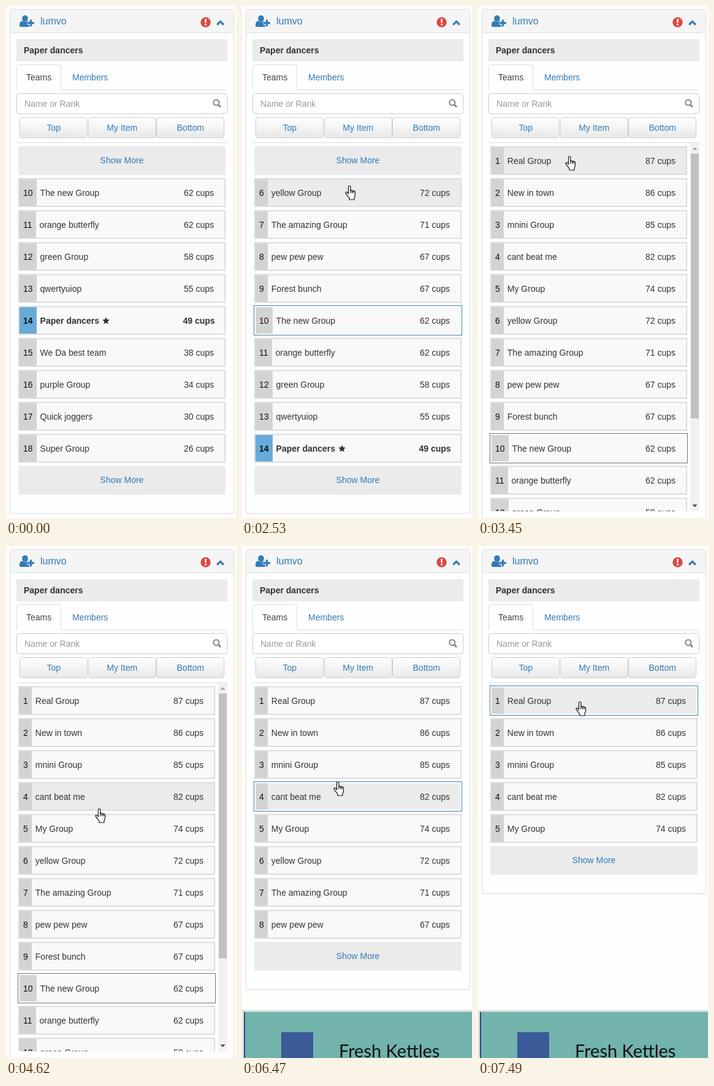
Write an HTML page that moves like this. It is 375 by 833 pixels and loops after 8 s.

```html
<!DOCTYPE html>
<html lang="en">
<head>
<meta charset="utf-8">
<title>Team ranking</title>
<style>
  html, body { margin: 0; width: 100%; height: 100%; overflow: hidden; background: #fefefe; }
  body { position: relative; font: 14px "Liberation Sans", Arial, sans-serif; color: #333; }
  svg.layer { position: absolute; left: 0; top: 0; }
  svg text { white-space: pre; }
  #panel { position: absolute; left: 6px; top: 5px; width: 366px; box-sizing: border-box;
    border: 1px solid #ddd; border-radius: 4px; background: #fefefe; box-shadow: 0 1px 1px rgba(0,0,0,.05); }
  #list { position: absolute; left: 17px; top: 223px; width: 344px; height: 599px; overflow: hidden; }
  .row, .more { position: absolute; left: 3px; width: 338px; height: 47px; box-sizing: border-box; white-space: pre; }
  .row { border: 2px solid #ddd; background: #f9f9f9; line-height: 44px; }
  .scroll .row { width: 321px; }
  .row.hover { background: #ebebeb; }
  .row.focus { border-color: #fefefe; outline: 1px solid #4385a5; background-clip: padding-box; }
  .scroll .row.focus { outline-color: #707070; }
  .row.own { font-weight: bold; }
  .rank { display: inline-block; height: 43px; padding: 0 6px; margin-right: 6px; background: #d3d3d3; color: #111; vertical-align: top; }
  .own .rank { background: #68aad9; }
  .row svg { margin-left: 5px; vertical-align: -1px; }
  .cups { position: absolute; right: 0; top: 0; width: 83px; text-align: center; }
  .more { background: #ebebeb; color: #337ab7; line-height: 46px; text-align: center; border-radius: 2px; }
  .more.hover { color: #23527c; text-decoration: underline; }
</style>
</head>
<body>
<svg class="layer" id="footer" width="375" height="833">
  <path d="M0 756.5H375" stroke="#ccd3d3" stroke-width="2"/>
  <rect y="758" width="3" height="75" fill="#e4e8ea"/>
  <rect x="3" y="758" width="2" height="75" fill="#27497e"/>
  <rect x="5" y="758" width="370" height="75" fill="#72b3ab"/>
  <rect x="64" y="791" width="52" height="42" fill="#3b5a98"/>
  <text x="158" y="832" font-family="Lato, sans-serif" font-size="29" fill="#111">Fresh Kettles</text>
</svg>
<div id="panel"></div>
<div id="list"></div>
<svg class="layer" width="375" height="833" fill="#337ab7">
  <defs>
    <linearGradient id="face" x2="0" y2="1"><stop stop-color="#fff"/><stop offset="1" stop-color="#e8e8e8"/></linearGradient>
  </defs>
  <path d="M7 43V9a3 3 0 0 1 3-3H368a3 3 0 0 1 3 3V43Z" fill="#f5f5f5"/>
  <path d="M7 43.5H371" stroke="#ddd"/>
  <ellipse cx="31" cy="20.2" rx="4.8" ry="5.2"/>
  <path d="M22 31.5c0-4.500 1.500-7 5-7.200q4 3 8 0c3.500.2 5.500 2.700 5.500 7.200q0 2.500-2.500 2.500H24.500q-2.500 0-2.500-2.500Z"/>
  <path d="M40.500 21.500V34M34.500 27.700H46.500" stroke="#f5f5f5" stroke-width="5.500"/>
  <path d="M40.500 22.300V33.200M35 27.700H46" stroke="#337ab7" stroke-width="3.200"/>
  <text x="56" y="30" font-size="16">lumvo</text>
  <circle cx="325.5" cy="26.500" r="8.200" fill="#d64c45"/>
  <path d="M324 21h3l-.5 6.800h-2ZM324.200 29h2.600v2.500h-2.600Z" fill="#fff"/>
  <path d="M344.200 30.500L349.500 25.200L354.800 30.500" fill="none" stroke="#337ab7" stroke-width="3.200"/>

  <rect x="17" y="54" width="344" height="36" fill="#ebebeb"/>
  <text x="29" y="77" font-weight="bold" fill="#333">Paper dancers</text>
  <path d="M17.500 136.500V99.500a4 4 0 0 1 4-4H85.500a4 4 0 0 1 4 4V136.500H361" fill="none" stroke="#ddd"/>
  <text x="33" y="121" fill="#444">Teams</text>
  <text x="108" y="121">Members</text>
  <rect x="17.500" y="142.500" width="343" height="33" rx="4" fill="#fff" stroke="#ccc"/>
  <text x="30" y="164" fill="#999">Name or Rank</text>
  <g fill="none" stroke="#858585" stroke-width="2"><circle cx="342.800" cy="157" r="4.500"/><path d="M346 160.500L350 164.500" stroke-width="2.600"/></g>
  <g id="buttons" text-anchor="middle"></g>
  <path d="M17 222.500H361" stroke="#ddd"/>

  <g id="scrollbar">
    <rect x="346" y="223" width="15" height="599" fill="#f1f1f1"/>
    <rect x="347" y="240" width="13" height="431" fill="#c1c1c1"/>
    <path d="M349.500 234h8l-4-4.500Z" fill="#a3a3a3"/>
    <path d="M349.500 811h8l-4 4.500Z" fill="#505050"/>
  </g>
  <g id="cursor" fill="#fff" stroke="#111" stroke-width="1.200" stroke-linejoin="round">
    <path d="M5.500 13.500V2.200a1.700 1.700 0 0 1 3.400 0V8.800c.2-1.300 2.500-1.200 2.700.5c.3-1.300 2.300-1.100 2.500.5c.3-1.200 2.400-.9 2.400.9V15c0 2.200-1.500 3.500-1.500 5.500V23H7V20.800C5.500 18.200 3.300 16 1.200 12.900C0 11 2.400 9.800 3.800 11.400Z"/>
    <path d="M8.900 8.500V12.500M11.600 9.300V12.500M14.100 9.800V12.800" fill="none"/>
  </g>
</svg>
<script>
const LOOP = 8000, PITCH = 52, TOP = 228, OWN = 14;
const $ = id => document.getElementById(id);

const teams = [
  ["Real Group", 87], ["New in town", 86], ["mnini Group", 85], ["cant beat me", 82], ["My Group", 74],
  ["yellow Group", 72], ["The amazing Group", 71], ["pew pew pew", 67], ["Forest bunch", 67],
  ["The new Group", 62], ["orange butterfly", 62], ["green Group", 58], ["qwertyuiop", 55],
  ["Paper dancers", 49], ["We Da best team", 38], ["purple Group", 34], ["Quick joggers", 30], ["Super Group", 26]
];

// bottom: lower edge of the panel
const views = [
  { at: 0, first: 10, last: 18, above: true, bottom: 826 },
  { at: 1900, first: 6, last: 14, above: true, focus: 10, bottom: 826 },
  { at: 3450, first: 1, last: 14, focus: 10, bottom: 850, scroll: true },
  { at: 5230, first: 1, last: 8, focus: 4, bottom: 722, footer: true },
  { at: 7490, first: 1, last: 5, focus: 1, bottom: 566, footer: true }
];

// Pointer moves: the first step lands at start, the last at end; bend curves x.
const moves = [
  { start: 1050, end: 1520, steps: 7, to: [179, 309] },
  { start: 1670, end: 1750, steps: 2, to: [178, 309] },
  { start: 2530, end: 2840, steps: 5, to: [141, 231], bend: 1.5 },
  { start: 3080, end: 3130, steps: 2, to: [149, 245] },
  { start: 4080, end: 4620, steps: 8, to: [152, 428] },
  { start: 4840, end: 5000, steps: 3, to: [153, 417] },
  { start: 6390, end: 7090, steps: 10, to: [166, 254] }
];

function pointerAt(t) {
  if (t < moves[0].start) return null;
  let [x, y] = [186, 424];
  for (const { start, end, steps, to, bend = 1 } of moves) {
    if (t < start) break;
    const step = Math.floor((t - start) / (end - start) * (steps - 1) + 1e-6) + 1;
    const u = Math.min(1, step / steps);
    x += (to[0] - x) * u ** bend;
    y += (to[1] - y) * u;
  }
  return [x, y];
}

const star = '<svg width="12" height="12" viewBox="-6 -6 12 12"><polygon fill="#333" points="' +
  Array.from({ length: 10 }, (_, i) => {
    const r = i % 2 ? 2.9 : 6.3, a = i * Math.PI / 5;
    return `${(r * Math.sin(a)).toFixed(2)},${(0.4 - r * Math.cos(a)).toFixed(2)}`;
  }).join(" ") + '"/></svg>';

function rowHTML(rank, slot, view) {
  const [name, cups] = teams[rank - 1];
  const own = rank === OWN;
  const kind = "row" + (own ? " own" : "") + (rank === view.focus ? " focus" : "");
  return `<div class="${kind}" style="top:${slotTop(slot)}px"><span class="rank">${rank}</span>` +
    `${name}${own ? star : ""}<span class="cups">${cups} cups</span></div>`;
}

const slotTop = slot => TOP - 223 + slot * PITCH;
const moreHTML = slot => `<div class="more" style="top:${slotTop(slot)}px">Show More</div>`;

function showView(view) {
  const items = view.above ? [moreHTML(0)] : [];
  for (let rank = view.first; rank <= view.last; rank++) items.push(rowHTML(rank, items.length, view));
  items.push(moreHTML(items.length));
  $("list").innerHTML = items.join("");
  $("list").className = view.scroll ? "scroll" : "";
  $("panel").style.height = view.bottom - 5 + "px";
  $("scrollbar").style.display = view.scroll ? "" : "none";
  $("footer").style.display = view.footer ? "" : "none";
}

$("buttons").innerHTML = ["Top", "My Item", "Bottom"].map((label, i) => {
  const x = 22.5 + i * 111.5;
  return `<rect x="${Math.floor(x) + 0.5}" y="181.5" width="110" height="33" rx="4" fill="url(#face)" stroke="#ccc"/>` +
    `<text x="${x + 55.2}" y="203">${label}</text>`;
}).join("");

let shown;
function draw(t) {
  const view = views.filter(v => v.at <= t).pop();
  if (view !== shown) showView(shown = view);
  const tip = pointerAt(t);
  $("cursor").style.display = tip ? "" : "none";
  if (tip) $("cursor").setAttribute("transform", `translate(${Math.round(tip[0]) - 7} ${Math.round(tip[1]) - 1})`);
  const offset = tip ? tip[1] - TOP : -1;
  const hovered = offset >= 0 && offset % PITCH < 47 ? Math.floor(offset / PITCH) : -1;
  [...$("list").children].forEach((item, i) => item.classList.toggle("hover", i === hovered));
}

function tick() {
  draw(performance.now() % LOOP);
  requestAnimationFrame(tick);
}
tick();
</script>
</body>
</html>
```
